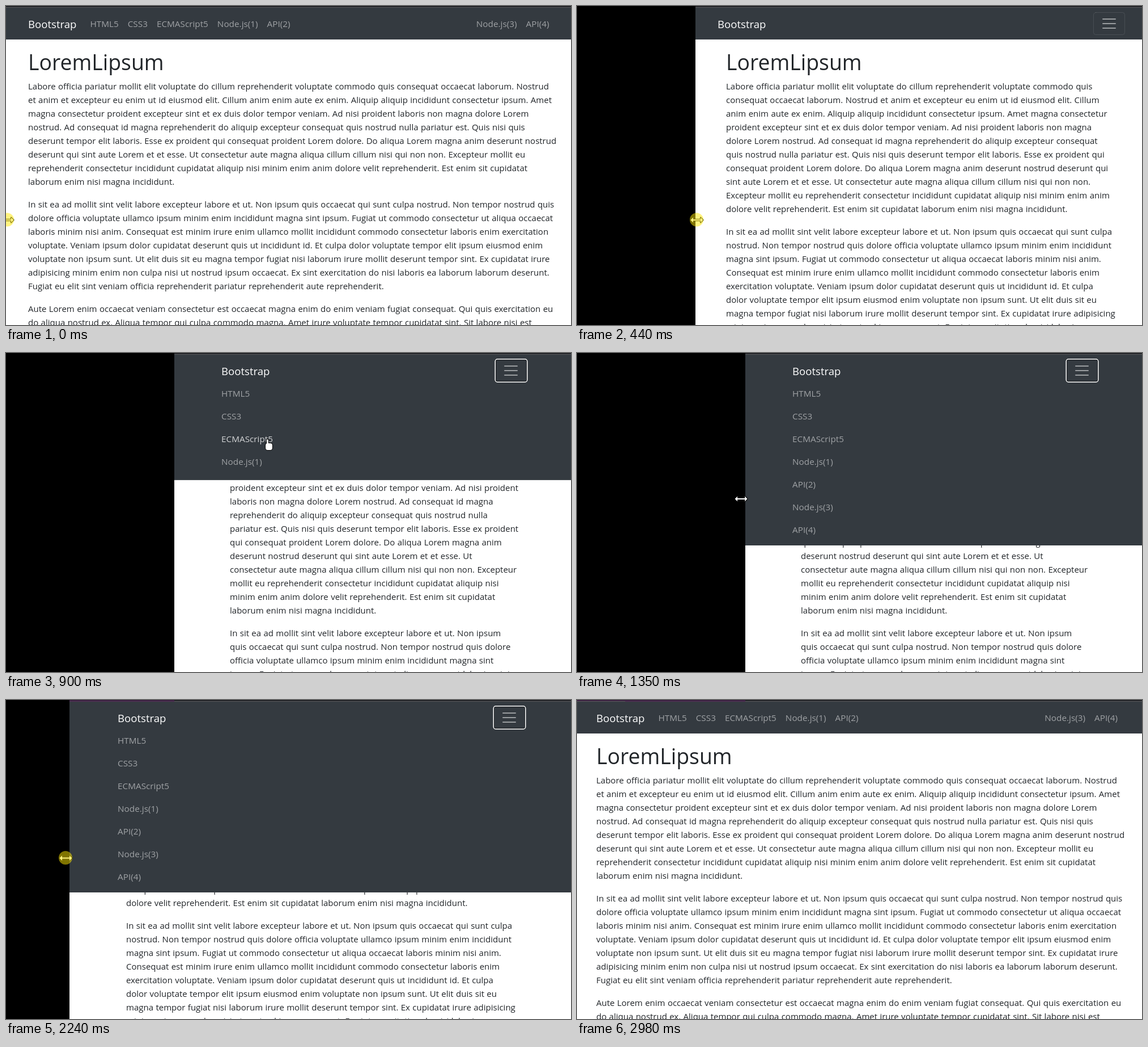
Write an HTML page with a canvas that moves like this. It is 997 px wide and 562 px high and loops after 3.35 s.

```html
<!DOCTYPE html>
<html lang="en">
<head>
<meta charset="utf-8">
<title>Responsive navbar</title>
<style>
html, body { margin: 0; width: 100%; height: 100%; overflow: hidden; background: #000; }
canvas { display: block; }
</style>
</head>
<body>
<canvas id="stage" width="997" height="562"></canvas>
<script>
const W = 997, H = 562, LOOP = 3350, STEP = 74.5;
const ctx = document.getElementById('stage').getContext('2d', { alpha: false });
const FAMILY = '"Open Sans", "Noto Sans", sans-serif';

// Line breaks: "|" wide, "/" medium, "~" narrow container
const PARAS = [
  'Labore officia pariatur mollit elit voluptate do cillum reprehenderit ~voluptate commodo quis ' +
  '/consequat occaecat laborum. Nostrud |et anim ~et excepteur eu enim ut id eiusmod elit. Cillum ' +
  '/anim enim aute ex enim. ~Aliquip aliquip incididunt consectetur ipsum. Amet |magna consectetur ' +
  '/~proident excepteur sint et ex duis dolor tempor veniam. Ad nisi proident ~laboris non magna ' +
  '/dolore Lorem |nostrud. Ad consequat id magna ~reprehenderit do aliquip excepteur consequat ' +
  '/quis nostrud nulla ~pariatur est. Quis nisi quis |deserunt tempor elit laboris. Esse ex proident ' +
  '~qui /consequat proident Lorem dolore. Do aliqua Lorem magna anim ~deserunt nostrud |deserunt qui ' +
  '/sint aute Lorem et et esse. Ut ~consectetur aute magna aliqua cillum cillum nisi qui non non. ' +
  '/Excepteur ~mollit eu |reprehenderit consectetur incididunt cupidatat aliquip nisi ~minim enim anim ' +
  '/dolore velit reprehenderit. Est enim sit cupidatat |~laborum enim nisi magna incididunt.',
  'In sit ea ad mollit sint velit labore excepteur labore et ut. Non ipsum ~quis occaecat qui sunt culpa ' +
  '/nostrud. Non tempor nostrud quis |dolore ~officia voluptate ullamco ipsum minim enim incididunt ' +
  '/magna sint ~ipsum. Fugiat ut commodo consectetur ut aliqua occaecat |laboris minim ~nisi anim. ' +
  '/Consequat est minim irure enim ullamco mollit incididunt commodo consectetur laboris enim ' +
  '/exercitation |voluptate. Veniam ipsum dolor cupidatat deserunt quis ut incididunt id. Et culpa ' +
  '/dolor voluptate tempor elit ipsum eiusmod enim |voluptate non ipsum sunt. Ut elit duis sit eu ' +
  '/magna tempor fugiat nisi laborum irure mollit deserunt tempor sint. Ex cupidatat irure |adipisicing ' +
  '/minim enim non culpa nisi ut nostrud ipsum occaecat. Ex sint exercitation do nisi laboris ea ' +
  '/laborum laborum deserunt. |Fugiat eu elit sint veniam officia reprehenderit pariatur ' +
  'reprehenderit aute reprehenderit.',
  'Aute Lorem enim occaecat veniam consectetur est occaecat magna enim do enim veniam fugiat consequat. ' +
  'Qui quis exercitation eu |do aliqua nostrud ex. Aliqua tempor qui culpa commodo magna. Amet irure ' +
  'voluptate tempor cupidatat sint. Sit labore nisi est'
];
const LEFT_LINKS = ['HTML5', 'CSS3', 'ECMAScript5', 'Node.js(1)', 'API(2)'];
const RIGHT_LINKS = ['Node.js(3)', 'API(4)'];
const LINKS = [...LEFT_LINKS, ...RIGHT_LINKS];
const LINK_SIZE = 15.3, LINK_GAP = 16, ROW = 40;

const linesFor = mark => PARAS.map(p => p
  .replace(/[|/~]/g, c => c === mark ? '\n' : '')
  .split('\n').map(s => s.trim()));
const LAYOUTS = { 960: linesFor('|'), 720: linesFor('/'), 540: linesFor('~') };

// Window edges at the turning points: step, left, right
const PAGE = [
  [0, 0, 1007], [6, 209, 1007], [10, 297, 1003], [24, 297, 1003], [25, 283, 989],
  [26, 249, 1003], [30, 112, 1001.5], [34, 15, 1001], [36, -9, 1007]
];
// Pointer path after the first drag: step, x, y
const POINTER = [
  [11, 888, 33], [12, 461, 152], [15, 296, 235], [22, 280, 285], [24, 280, 285],
  [25, 270, 284], [30, 105, 278], [34, 7, 281], [37, 3, 286], [39, 160, 345]
];

function along(keys, i) {
  const next = keys.findIndex(k => k[0] >= i);
  if (next < 0) return keys[keys.length - 1].slice(1);
  if (next === 0) return keys[0].slice(1);
  const a = keys[next - 1], b = keys[next];
  const p = (i - a[0]) / (b[0] - a[0]);
  return a.slice(1).map((v, k) => v + (b[k + 1] - v) * p);
}

function menuHeight(i) {
  const p = Math.min(1, Math.max(0, (i - 10) / 5));
  return LINKS.length * ROW * (1 - (1 - p) ** 1.74);
}

function rect(color, x, y, w, h) {
  ctx.fillStyle = color;
  ctx.fillRect(x, y, w, h);
}

// Returns the width of the text
function text(str, x, y, size, color, weight = 400) {
  ctx.font = `${weight} ${size}px ${FAMILY}`;
  ctx.fillStyle = color;
  ctx.fillText(str, x, y);
  return ctx.measureText(str).width;
}

function box(x, y, w, h, r, color, width = 1) {
  ctx.strokeStyle = color;
  ctx.lineWidth = width;
  ctx.beginPath();
  ctx.roundRect(x, y, w, h, r);
  ctx.stroke();
}

function drawContent(x, width) {
  text('LoremLipsum', x, 113, 37.4, '#212529', 500);
  ctx.wordSpacing = '0.46px';
  let y = 147;
  for (const lines of LAYOUTS[width]) {
    for (const line of lines) {
      if (y < H + 16) text(line, x, y, 15, '#212529');
      y += 24;
    }
    y += 16;
  }
  ctx.wordSpacing = '0px';
}

function drawToggler(right, focused) {
  const x = right - 57;
  if (focused) {
    box(x + 1, 12, 55, 38, 3, '#16191c', 1.5);
    box(x + 0.25, 10.75, 56.5, 40.5, 4, '#fff', 1.5);
  } else {
    box(x + 0.5, 11.5, 55, 39, 4, 'rgba(255,255,255,.1)');
  }
  ctx.strokeStyle = 'rgba(255,255,255,.5)';
  ctx.lineWidth = 2;
  ctx.lineCap = 'round';
  ctx.beginPath();
  for (let y = 23; y <= 39; y += 8) {
    ctx.moveTo(x + 17, y);
    ctx.lineTo(x + 39, y);
  }
  ctx.stroke();
}

function drawLink(str, x, y, bright) {
  return text(str, x, y, LINK_SIZE, `rgba(255,255,255,${bright ? 0.78 : 0.53})`);
}

function drawWideLinks(start, end) {
  for (const s of LEFT_LINKS) start += drawLink(s, start, 37) + LINK_GAP;
  for (const s of [...RIGHT_LINKS].reverse()) {
    end -= ctx.measureText(s).width;
    drawLink(s, end, 37);
    end -= LINK_GAP;
  }
}

function drawMenu(x, left, right, open, hover) {
  ctx.save();
  ctx.beginPath();
  ctx.rect(left, 51, right - left, open + 8);
  ctx.clip();
  LINKS.forEach((s, k) => drawLink(s, x, 77 + k * ROW, k === hover));
  ctx.restore();
}

function drawNav(i, left, right, mid, width, hover) {
  const wide = width === 960;
  const open = wide ? 0 : menuHeight(i);
  rect('#212226', left, 0, right - left, 2);
  rect('#5b5c5f', left, 2, right - left, 1);
  rect('#343a40', left, 3, right - left, 56 + open);
  if (i >= 25) drawTopRemains(Math.max(left, 0));

  const x = Math.round(mid - width / 2) + (wide ? 15 : 0);
  const brand = text('Bootstrap', x, 39, 18.6, '#fff');
  if (wide) {
    drawWideLinks(x + brand + 24, mid + 455);
  } else {
    drawToggler(Math.round(mid + width / 2), i >= 11);
    if (open) drawMenu(x, left, right, open, hover);
  }
}

// Strip of the window above that shows once the page grows back
function drawTopRemains(from) {
  rect('#3a2040', from, 0, Math.max(0, 297 - from), 2);
  rect('#55345a', Math.max(from, 85), 2, Math.max(0, 297 - Math.max(from, 85)), 1);
}

function drawScrollbar(x) {
  rect('#f1f1f1', x, 3, 17, H);
  rect('#c1c1c1', x + 2, 20, 13, 348);
  ctx.fillStyle = '#505050';
  ctx.beginPath();
  ctx.moveTo(x + 4.5, 13);
  ctx.lineTo(x + 8.5, 9);
  ctx.lineTo(x + 12.5, 13);
  ctx.fill();
}

// White shape with a thin black outline
function outlined(path) {
  ctx.lineJoin = 'round';
  ctx.lineWidth = 2;
  ctx.strokeStyle = '#000';
  ctx.stroke(path);
  ctx.fillStyle = '#fff';
  ctx.fill(path);
}

function drawHand(x, y) {
  const hand = new Path2D();
  hand.roundRect(x - 1, y, 3, 14, 1.5);
  hand.roundRect(x - 3, y + 7, 12, 12, 4);
  outlined(hand);
}

function drawResize(x, y) {
  const arrows = new Path2D();
  arrows.rect(x - 7, y - 1, 14, 2);
  for (const s of [-1, 1]) {
    arrows.moveTo(x + s * 11, y);
    arrows.lineTo(x + s * 6.5, y + s * 4.5);
    arrows.lineTo(x + s * 6.5, y - s * 4.5);
    arrows.closePath();
  }
  outlined(arrows);
}

function drawBeam(x, y) {
  rect('#000', x, y - 8, 1, 16);
  rect('#000', x - 3, y - 8, 7, 1);
  rect('#000', x - 3, y + 8, 7, 1);
}

function drawCursor(i, x, y) {
  if (i >= 38) return drawBeam(x, y);
  if (i >= 10 && i < 15) return drawHand(x, y);
  drawResize(x + 0.5, y + 0.5);
  if (i < 10 || i >= 24) {
    ctx.fillStyle = 'rgba(255,232,0,.5)';
    ctx.beginPath();
    ctx.arc(x, y, 12, 0, Math.PI * 2);
    ctx.fill();
  }
}

function draw(t) {
  const i = Math.floor((t + 8) / STEP);
  const [left, right] = along(PAGE, i);
  const [mx, my] = i < 10 ? [left + 2, 376.5] : along(POINTER, i);
  const mid = (left + right) / 2, view = right - left + 17;
  const width = view >= 992 ? 960 : view >= 768 ? 720 : 540;
  const hover = i >= 12 && i < 15 ? Math.floor((my - 51) / ROW) : -1;
  const edge = Math.round(left);

  rect('#000', 0, 0, W, H);
  rect('#fff', edge, 3, right - edge, H);
  drawContent(Math.round(mid - width / 2 + 15), width);
  drawNav(i, edge, right, mid, width, hover);
  if (right < W) drawScrollbar(right);
  if (i < 40) drawCursor(i, mx, my);
}

function tick() {
  draw(performance.now() % LOOP);
  requestAnimationFrame(tick);
}
tick();
</script>
</body>
</html>
```
